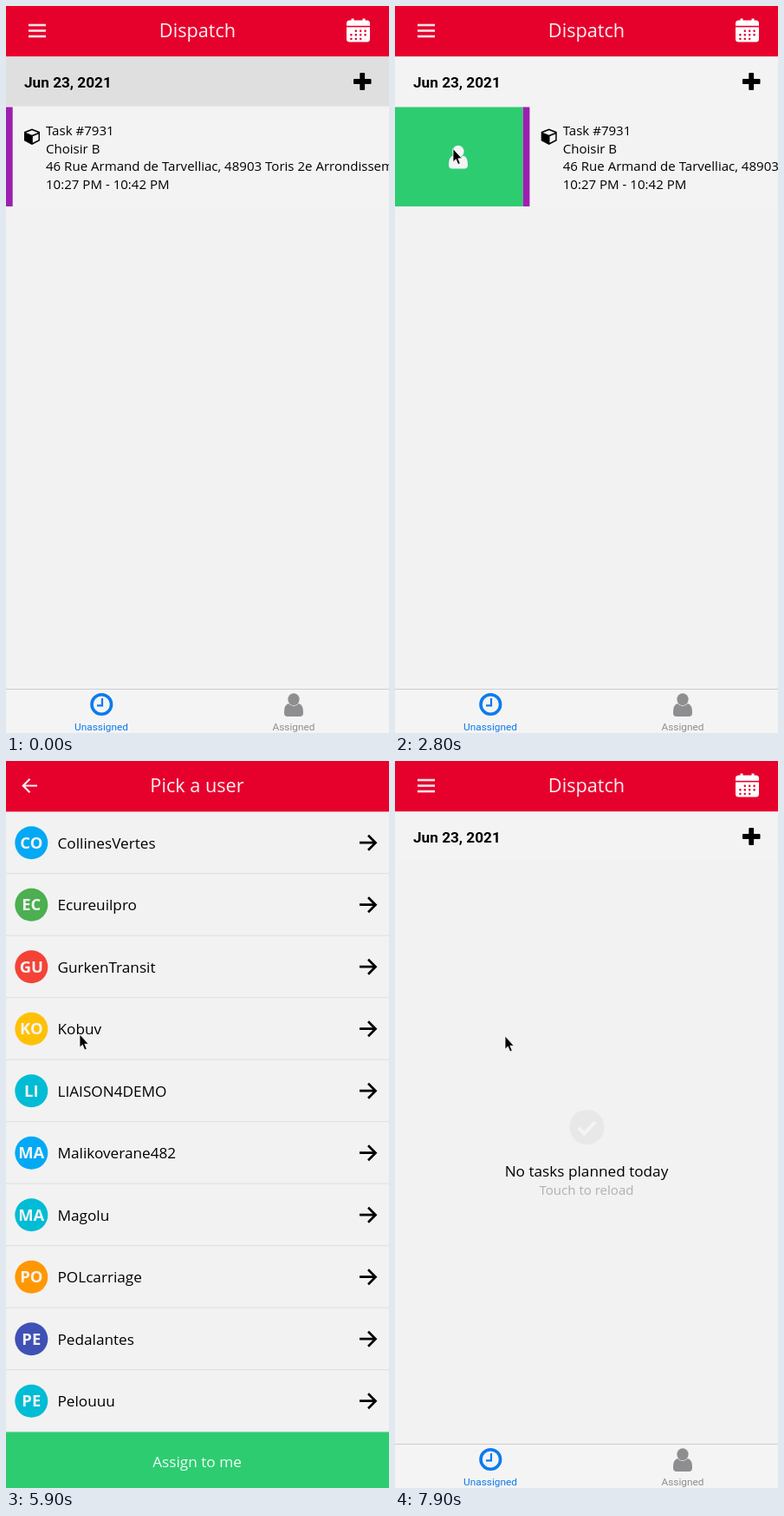
An HTML page for the animation above (8 s loop, 442 by 838 pixels).

```html
<!DOCTYPE html>
<html lang="en">
<head>
<meta charset="utf-8">
<title>Dispatch</title>
<style>
  html, body { margin: 0; width: 100%; height: 100%; overflow: hidden; background: #f2f2f2; }
  svg { display: block; width: 442px; height: 838px; overflow: hidden; }
  text { white-space: pre; }
  .body { font: 15.05px "Open Sans", "Noto Sans", sans-serif; }
  .item { font: 17.2px "Open Sans", "Noto Sans", sans-serif; }
  .title { font: 21.7px "Open Sans", "Noto Sans", sans-serif; fill: #fdf0f2; }
  .initials { font: 700 18.4px "Open Sans", "Noto Sans", sans-serif; fill: #f4f4f4; }
  .date { font: 700 17.2px Roboto, sans-serif; }
  .tab { font: 11.83px Roboto, sans-serif; }
  .mid { text-anchor: middle; }
  .line { fill: none; stroke-linecap: butt; }
</style>
</head>
<body>
<svg id="stage" viewBox="0 0 442 838"></svg>
<script>
const LOOP = 8000, RED = '#e6012d', GREEN = '#2ecc71', BLUE = '#0b7bee';
const BLEED = 6; // the picker's fills reach past the stage, so no gap shows while it settles
const $ = id => document.getElementById(id);
const rect = (x, y, w, h, fill, extra = '') =>
  `<rect x="${x}" y="${y}" width="${w}" height="${h}" fill="${fill}" ${extra}/>`;
const text = (x, y, s, cls, extra = '') => `<text x="${x}" y="${y}" class="${cls}" ${extra}>${s}</text>`;
const line = (d, color, width) => `<path class="line" d="${d}" stroke="${color}" stroke-width="${width}"/>`;
const person = (x, y, fill) => `<g transform="translate(${x} ${y})" fill="${fill}">
  <ellipse cy="-6.3" rx="6.6" ry="7"/>
  <path d="M-6 -1.5Q0 4.500 6 -1.500Q11.200 0 11 9.500Q11 13.500 7 13.500H-7Q-11 13.500 -11 9.500Q-11.200 0 -6 -1.500Z"/></g>`;

const users = [
  ['CollinesVertes', '#03a9f4'], ['Ecureuilpro', '#4caf50'], ['GurkenTransit', '#f44336'],
  ['Kobuv', '#ffc107'], ['LIAISON4DEMO', '#00bcd4'], ['Malikoverane482', '#03a9f4'],
  ['Magolu', '#00bcd4'], ['POLcarriage', '#ff9800'], ['Pedalantes', '#3f51b5'], ['Pelouuu', '#00bcd4']
];
const taskLines = ['Task #7931', 'Choisir B',
  '46 Rue Armand de Tarvelliac, 48903 Toris 2e Arrondissement', '10:27 PM - 10:42 PM'];

function calendar() {
  let dots = '';
  [[403.8, 3], [398.4, 4], [398.4, 3]].forEach(([x, n], row) => {
    for (let i = 0; i < n; i++) dots += rect(x + i * 5.4 - 1.2, 27.5 + row * 4.6, 2.4, 2.4, RED, 'rx=".8"');
  });
  return rect(393, 16.5, 27, 25, '#fff', 'rx="3.5"') + rect(398.5, 14.5, 3, 4, '#fff') +
    rect(411.5, 14.5, 3, 4, '#fff') + rect(393, 22.8, 27, 1.6, RED) + dots;
}

function dispatchScreen() {
  const cube = `<path fill-rule="evenodd" d="M30 141.500L39 145V155.200L30 160L21 155.200V145Z
    M30 143.300L23 146L30 148.700L37 146ZM30.800 150.200V157.800L37.500 154.200V147.600Z"/>`;
  const task = rect(0, 116.5, 442, 114.5, '#f3f3f3') + rect(0, 116.5, 7.7, 114.5, '#9c20b0') + cube +
    taskLines.map((s, i) => text(46, 149 + i * 20.5, s, 'body')).join('');
  const empty = `<circle cx="221.500" cy="422" r="20" fill="#e9e8e9"/>` +
    line('M212 423L218.500 429.500L231 416', '#f5f4f4', 4) +
    text(221, 479, 'No tasks planned today', 'item mid') +
    text(221, 500, 'Touch to reload', 'body mid', 'fill="#b1b0b0"');
  return rect(0, 0, 442, 838, '#f2f2f2') + rect(0, 0, 442, 58.4, RED) +
    [22, 28.5, 35].map(y => rect(26, y - 1.3, 20, 2.6, '#f8e3e6')).join('') +
    text(221, 36, 'Dispatch', 'title mid') + calendar() +
    rect(0, 58.4, 442, 57.1, '#dfdfdf', 'id="dateBar"') +
    text(21, 94, 'Jun 23, 2021', 'date') +
    rect(401, 84.1, 20.5, 5.8, '#000', 'rx="1"') + rect(408.3, 77, 5.8, 20, '#000', 'rx="1"') +
    `<g id="tasks">${rect(0, 116.5, 148, 114.5, GREEN, 'id="action"')}
      <g id="actionIcon">${person(73, 174, '#f4f4f4')}</g><g id="task">${task}</g></g>
    <g id="empty">${empty}</g>` +
    rect(0, 787, 442, 51, '#f4f4f4') + rect(0, 787, 442, 1, '#cdcdcd') +
    `<circle cx="110.300" cy="805" r="11.300" fill="none" stroke="${BLUE}" stroke-width="3.600"/>` +
    line('M111 798V806.300H105', BLUE, 2.2) + text(110, 835, 'Unassigned', 'tab mid', `fill="${BLUE}"`) +
    person(332, 805.5, '#8e8e90') + text(332, 835, 'Assigned', 'tab mid', 'fill="#8e8e90"');
}

function pickScreen() {
  const wide = (y, h, fill) => rect(-BLEED, y, 442 + 2 * BLEED, h, fill);
  const rows = users.map(([name, color], i) => {
    const y = 94.2 + i * 71.5;
    return wide(y + 35, 1, '#dedede') + `<g id="user${i}">
      <circle cx="29.300" cy="${y}" r="19" fill="${color}"/>` +
      text(29.3, y + 6.6, name.slice(0, 2).toUpperCase(), 'initials mid') +
      text(59.5, y + 6.3, name, 'item') +
      line(`M408 ${y}H426.500M418 ${y - 8.5}L426.500 ${y}L418 ${y + 8.5}`, '#000', 2.7) + '</g>';
  }).join('');
  return wide(0, 838, '#f2f2f2') + rows + rect(438, 58, 4 + BLEED, 358, '#a9a9a9', 'id="scrollbar"') +
    wide(-BLEED, 58.4 + BLEED, RED) +
    line('M36 28.500H20M27.500 20.700L19.800 28.500L27.500 36.300', '#fbeef0', 2.2) +
    text(220.5, 36, 'Pick a user', 'title mid') +
    wide(773.5, 64.5 + BLEED, GREEN) + text(220.5, 813.5, 'Assign to me', 'item mid', 'fill="#f2fbf5"');
}

$('stage').innerHTML = `<g id="dispatch">${dispatchScreen()}</g><g id="pick">${pickScreen()}</g>
  <g id="loading">${rect(0, 0, 442, 838, '#000', 'opacity=".235"')}
    <path id="spinner" fill="none" stroke="#fff" stroke-width="3"/></g>
  <path id="cursor" d="M0 0V15.200L3.300 12.200L5.800 18L8.300 17L5.900 11.300H10.300Z" stroke="#fff" stroke-width=".8"/>`;

const clamp = x => Math.max(0, Math.min(1, x));
const smooth = x => x * x * (3 - 2 * x);

// Interpolates [time, ...values] keys.
function track(keys, t) {
  const i = keys.findIndex(k => k[0] > t);
  if (i === 0) return keys[0].slice(1);
  if (i < 0) return keys[keys.length - 1].slice(1);
  const a = keys[i - 1], b = keys[i], u = smooth((t - a[0]) / (b[0] - a[0]));
  return a.slice(1).map((v, j) => v + (b[j + 1] - v) * u);
}

// cubic-bezier(.35, .45, 0, 1)
function ease(x) {
  x = clamp(x);
  let lo = 0, hi = 1;
  for (let i = 0; i < 24; i++) {
    const s = (lo + hi) / 2;
    if (1.05 * s * (1 - s) ** 2 + s ** 3 < x) lo = s; else hi = s;
  }
  return 1.35 * lo * (1 - lo) ** 2 + 3 * lo * lo * (1 - lo) + lo ** 3;
}

const cursorKeys = [
  [290, 442, 160], [600, 240, 305], [1000, 24, 178], [1150, 24, 178], [1300, 56, 182.5], [1400, 56, 182.5],
  [1900, 218, 188], [2100, 218, 188], [2600, 67, 164.5], [4200, 67, 164.5], [4650, 127, 287],
  [4800, 127, 287], [5000, 73, 315], [5200, 85, 315], [7500, 85, 315], [7800, 127, 317]
];
const swipeKeys = [[1400, 0], [1900, 162], [2100, 147.7]];
const pressKeys = [[5310, 1], [5430, 0.25], [5600, 1]];

const zoom = s => `translate(221 419) scale(${s}) translate(-221 -419)`;
const show = (id, on) => $(id).setAttribute('display', on ? 'inline' : 'none');
const set = (id, name, value) => $(id).setAttribute(name, value);

function arc(cx, cy, r, from, sweep) {
  const point = deg => {
    const a = deg * Math.PI / 180;
    return `${cx + r * Math.cos(a)} ${cy + r * Math.sin(a)}`;
  };
  return `M${point(from)}A${r} ${r} 0 ${sweep > 180 ? 1 : 0} 1 ${point(from + sweep)}`;
}

function draw(t) {
  const closing = t > 5000;
  const p = closing ? 1 - ease((t - 6110) / 270) : ease((t - 3232) / 400);
  set('dispatch', 'transform', zoom(1 + 0.1 * p));
  set('pick', 'transform', zoom(closing ? 0.925 + 0.075 * p : 0.85 + 0.15 * p));
  set('pick', 'opacity', clamp((p - 0.2) / 0.7));
  show('pick', p > 0);

  const swipe = closing ? 0 : track(swipeKeys, t)[0];
  set('task', 'transform', `translate(${swipe} 0)`);
  set('action', 'width', swipe + 1);
  show('action', swipe > 0);
  show('actionIcon', swipe > 0);
  set('dateBar', 'fill', t < 2100 ? '#dfdfdf' : '#f3f3f3');

  const loaded = t >= 7400;
  show('tasks', !loaded);
  show('empty', loaded);
  show('loading', t >= 6150 && !loaded);
  const turn = (t - 6200) / 1333;
  set('spinner', 'd', arc(221, 394.2, 14.4, -32 + 450 * turn, 115 + 75 * Math.cos(2 * Math.PI * turn)));

  set('scrollbar', 'height', t < 3800 ? 358 : 90);
  set('scrollbar', 'opacity', 1 - clamp((t - 4700) / 300));
  set('user3', 'opacity', track(pressKeys, t)[0]);

  show('cursor', t >= 290);
  set('cursor', 'transform', `translate(${track(cursorKeys, t)})`);
}

const start = performance.now();
function frame() {
  draw((performance.now() - start) % LOOP);
  requestAnimationFrame(frame);
}
frame();
</script>
</body>
</html>
```
